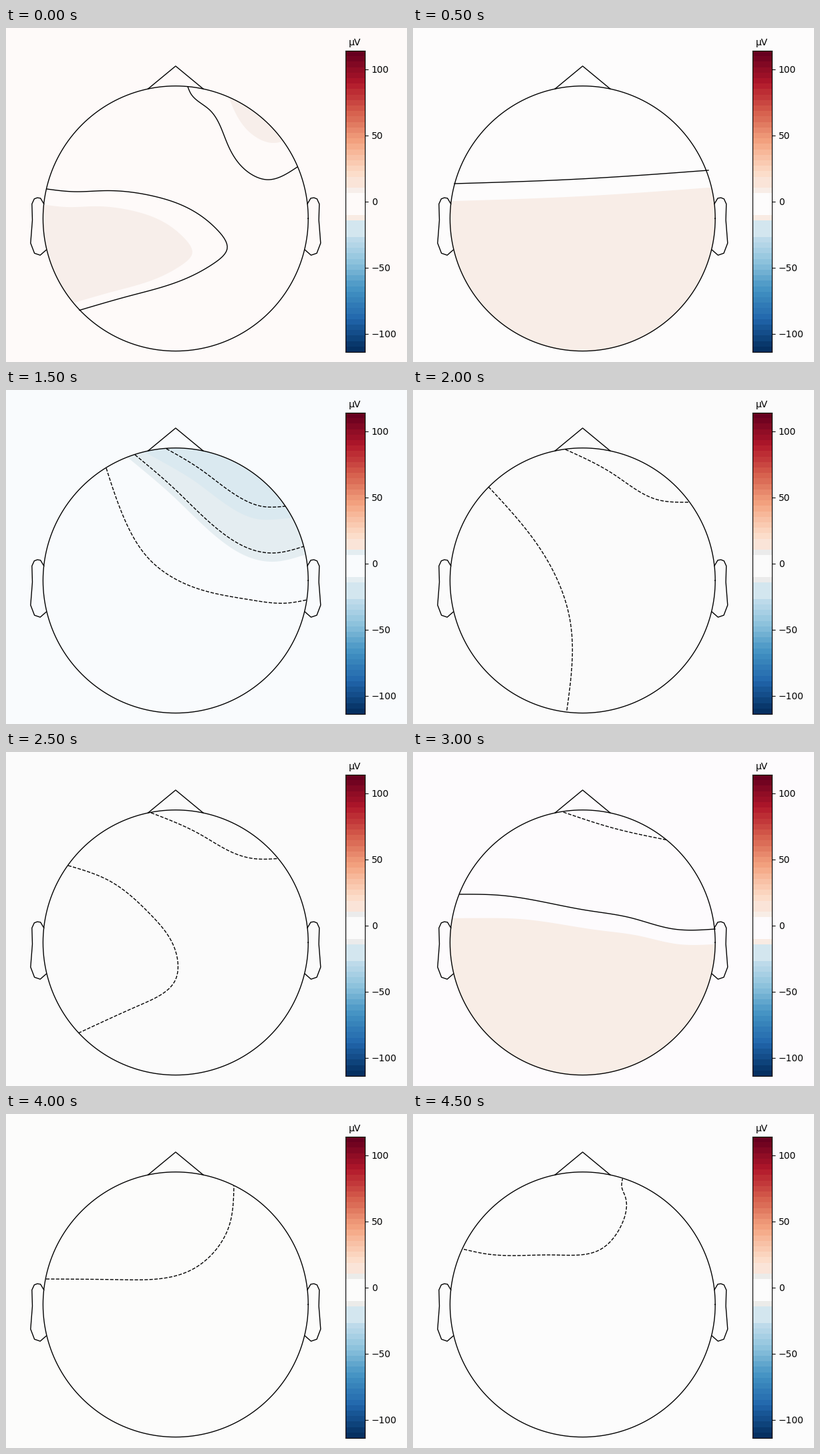
A matplotlib script for the animation above (5 s loop, 600 px wide and 500 px high).

```python
import numpy as np
import matplotlib.pyplot as plt
from matplotlib.animation import FuncAnimation
from matplotlib.patches import Circle, Polygon

W, H, DPI = 600, 500, 100
CX, CY, R = 253.8, 285.2, 198.4
VMAX, BANDS = 113.8, 55
PALE_BLUE = (211, 230, 239)
PEACH = (250, 228, 216)
WARM = (249, 235, 227)
DOWN, LEFT, UP_RIGHT = (0, 1), (-1, 0), (1, -1)


def rgb(c):
    return tuple(v / 255 for v in c)


def spline(*points, n=120):
    """Natural cubic spline through the points, by chord length."""
    p = np.array(points, float)
    h = np.hypot(*np.diff(p, axis=0).T)
    s = np.r_[0, np.cumsum(h)]
    slope = np.diff(p, axis=0) / h[:, None]
    a = np.eye(len(p))
    b = np.zeros_like(p)
    for i in range(1, len(p) - 1):
        a[i, i - 1:i + 2] = h[i - 1], 2 * (h[i - 1] + h[i]), h[i]
        b[i] = 6 * (slope[i] - slope[i - 1])
    m = np.linalg.solve(a, b)
    t = np.linspace(0, s[-1], n)
    k = np.clip(np.searchsorted(s, t) - 1, 0, len(h) - 1)
    u, v, hk = (t - s[k])[:, None], (s[k + 1] - t)[:, None], h[k][:, None]
    return ((m[k] * v**3 + m[k + 1] * u**3) / (6 * hk)
            + (p[k] / hk - m[k] * hk / 6) * v + (p[k + 1] / hk - m[k + 1] * hk / 6) * u)


def region(line, side, shift, scale=1):
    """Area on one side of a moved copy of a line, its ends run on straight."""
    edge = line * scale + shift
    first, last = edge[0] - edge[1], edge[-1] - edge[-2]
    first = edge[0] + 60 * first / np.hypot(*first)
    last = edge[-1] + 60 * last / np.hypot(*last)
    far = 400 * np.array(side)
    return np.vstack([first, edge, last, last + far, first + far])


scenes = []


def scene(bg, high, low=None, fills=(), solid=(), dashed=()):
    """high and low colour the scale bands that border the blank middle."""
    scenes.append((bg, high, low or high, fills, solid, dashed))


# Lobes on the left and at the upper right
lobe = spline((61, 241), (102, 245), (150, 243.5), (222, 252), (315, 301),
              (331, 330), (310, 353), (185, 401), (110, 422.5))
dip = spline((272, 88), (277, 99), (304, 122), (332, 175), (360, 214), (390, 227), (436, 208))
tint = (247, 238, 234)
scene((254, 250, 249), tint, WARM, solid=[lobe, dip],
      fills=[(tint, region(lobe, LEFT, (10.6, 69.7), 0.81)),
             (tint, region(dip, UP_RIGHT, (8, -55)))])

# Warm lower half
upper = spline((62, 233), (250, 226), (442, 213))
tint = (248, 237, 231)
scene((253, 252, 252), tint, WARM, solid=[upper],
      fills=[(tint, region(upper, DOWN, (0, 26)))])

# Two warm steps towards the back
upper = spline((70, 210), (180, 202), (250, 196.5), (360, 188.5), (422, 179.5))
lower = spline((63, 340.5), (125, 311), (220, 286.5), (350, 273.5), (405, 271), (452, 265))
tint = (249, 235, 228)
scene((253, 253, 253), tint, WARM, solid=[upper, lower],
      dashed=[spline((160, 110.5), (245, 108.5), (330, 101.5))],
      fills=[(tint, region(upper, DOWN, (0, 15))),
             ((247, 230, 218), region(lower, DOWN, (16, 21)))])

# Two cool steps at the upper right
inner = spline((240, 88), (290, 118), (345, 158), (385, 174.5), (418, 174))
middle = spline((193, 97), (250, 146), (320, 211), (375, 241), (400, 244), (446, 234))
outer = spline((150, 117), (175, 188), (215, 254), (280, 295), (365, 314), (420, 319), (451, 314))
tint = (228, 237, 241)
scene((249, 251, 253), tint, dashed=[inner, middle, outer],
      fills=[(tint, region(middle, UP_RIGHT, (0, 13))),
             ((218, 233, 240), region(inner, UP_RIGHT, (-7, 19)))])

# Nearly flat, lines only
grey = (235, 235, 235)
scene((251, 251, 251), grey,
      dashed=[spline((228, 89), (300, 126), (365, 164), (413, 168)),
              spline((113, 145), (195, 245), (235, 345), (230, 481))])
scene((251, 251, 251), grey,
      dashed=[spline((217, 91), (290, 123), (345, 153), (370, 159.5), (407, 159.5)),
              spline((93, 170), (155, 193), (215, 242), (254, 299), (254, 340),
                     (200, 379), (109, 420.5))])

# Warm back
wave = spline((70, 213), (130, 214.5), (260, 237), (325, 248), (390, 265), (452, 265))
tint = (248, 237, 230)
scene((253, 251, 253), tint, WARM, solid=[wave],
      dashed=[spline((225, 90), (300, 114), (379, 131.5))],
      fills=[(tint, region(wave, DOWN, (37.6, 88.9), (0.92, 0.75)))])

# Blank, then a corner at the upper left
grey = (235, 235, 233)
scene((252, 251, 249), grey)
scene((252, 252, 251), grey,
      dashed=[spline((60, 247), (170, 248), (280, 232), (333, 170), (341, 107))])
scene((252, 252, 252), grey,
      dashed=[spline((76, 202.5), (110, 209.5), (210, 211), (280, 203), (311, 168),
                     (317, 122), (312.5, 110), (313.5, 97))])

fig = plt.figure(figsize=(W / DPI, H / DPI), dpi=DPI)
ax = fig.add_axes([0, 0, 1, 1])
ax.set(xlim=(0, W), ylim=(H, 0), xticks=[], yticks=[])
ax.spines[:].set_visible(False)


def outline(x, y):
    ax.plot(x, y, color="black", lw=1, zorder=5)


angle = np.linspace(0, 2 * np.pi, 201)
outline(CX + R * np.cos(angle), CY + R * np.sin(angle))
outline([CX - 41.5, CX, CX + 41.5], [91.3, 57, 91.3])
ear_x = np.array([197.2, 202.2, 207, 211.5, 215, 214.3, 217, 211.2, 202.6, 193.6])
ear_y = [263.2, 254.8, 254.1, 255.8, 263.4, 287.5, 322, 337.2, 340.1, 332.2]
for side in (1, -1):
    outline(CX + side * ear_x, ear_y)
head = Circle((CX, CY), R, transform=ax.transData)

X0, X1, Y0, Y1 = 507.7, 537, 34.3, 485.2
bar = fig.add_axes([X0 / W, 1 - Y1 / H, (X1 - X0) / W, (Y1 - Y0) / H])
ramp = plt.get_cmap("RdBu_r")(np.linspace(1, 0, BANDS))[:, None, :3]
ramp[23:25] = rgb(PEACH)
ramp[31:34] = rgb(PALE_BLUE)
strip = bar.imshow(ramp, extent=(0, 1, -VMAX, VMAX), aspect="auto", interpolation="nearest")
bar.set(xticks=[], yticks=range(-100, 101, 50))
bar.yaxis.tick_right()
bar.set_title("µV", fontsize=10, pad=6)

moving = []


def draw(i):
    while moving:
        moving.pop().remove()
    bg, high, low, fills, solid, dashed = scenes[i]
    ax.set_facecolor(rgb(bg))
    bands = ramp.copy()
    bands[25], bands[26:30], bands[30] = rgb(high), rgb(bg), rgb(low)
    strip.set_data(bands)
    for color, shape in fills:
        area = ax.add_patch(Polygon(shape, fc=rgb(color), ec="none", zorder=2))
        area.set_clip_path(head)
        moving.append(area)
    for lines, style in ((solid, "-"), (dashed, "--")):
        for line in lines:
            moving.extend(ax.plot(*line.T, style, color="black", lw=1, zorder=3))
    return moving


anim = FuncAnimation(fig, draw, frames=len(scenes), init_func=lambda: draw(0),
                     interval=500, repeat=True, repeat_delay=0)
plt.show()
```
